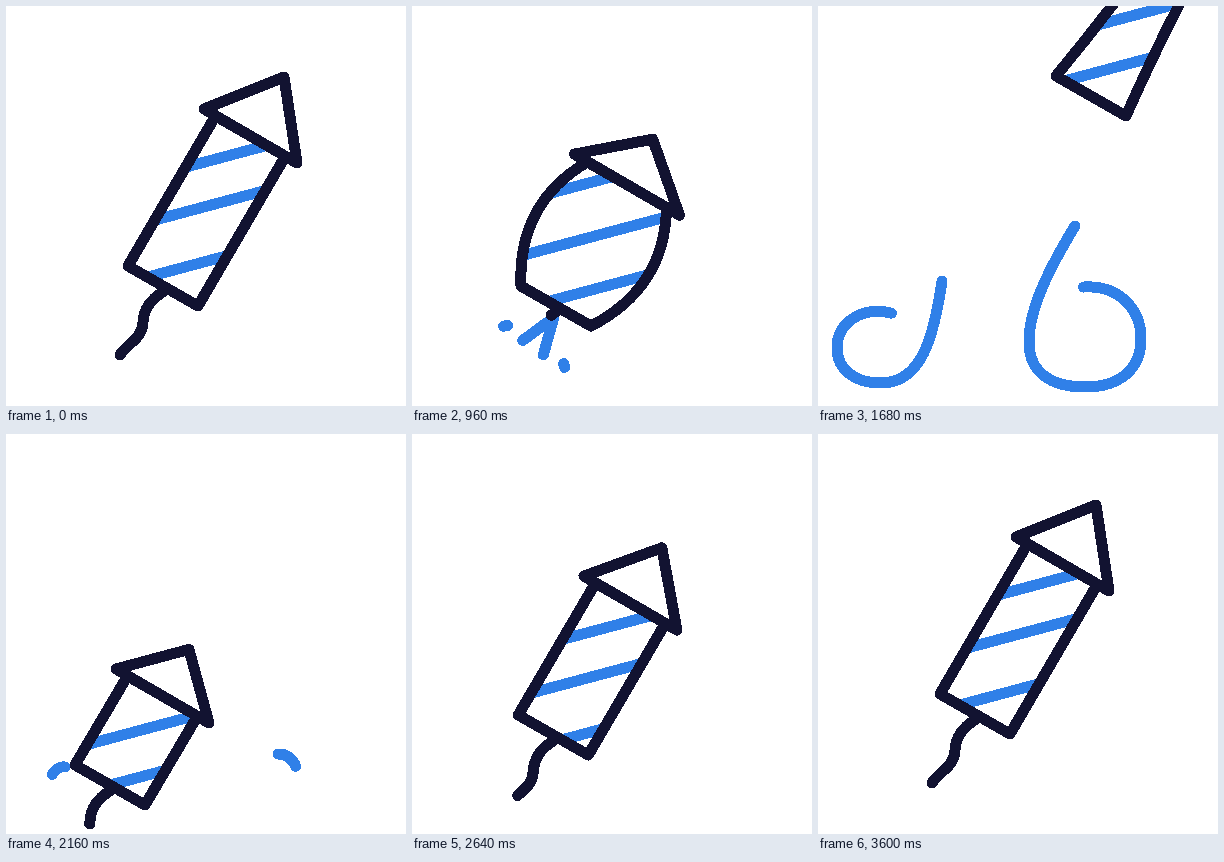
Animation of 400x400 px, one loop 3.63 s. Source, as an HTML page:

```html
<!DOCTYPE html>
<html lang="en">
<head>
<meta charset="utf-8">
<title>Firework rocket</title>
<style>
  html, body { margin: 0; height: 100%; overflow: hidden; background: #fff; }
  svg { display: block; width: 100vw; height: 100vh; shape-rendering: crispEdges; }
  path { fill: none; stroke-width: 11; stroke-linecap: round; stroke-linejoin: round; }
  .ink { stroke: #121331; }
  .blue { stroke: #3080e8; }
  .solid { fill: #fff; }
</style>
</head>
<body>
<svg viewBox="0 0 400 400">
  <clipPath id="inside"><path id="hull"/></clipPath>
  <path id="left" class="blue"/>
  <path id="right" class="blue"/>
  <path id="sparks" class="blue"/>
  <path id="fuse" class="ink" d="M158 285C144 294 138 303 137 316C136 334 122 336 114 349"/>
  <path id="fill" class="solid"/>
  <g clip-path="url(#inside)"><path id="stripes" class="blue"/></g>
  <path id="body" class="ink"/>
  <path id="cone" class="ink solid"/>
</svg>
<script>
const LOOP = 3630, STEP = 30;
const $ = id => document.getElementById(id);
const draw = (id, d) => $(id).setAttribute('d', d);
const show = (id, on) => { $(id).style.visibility = on ? 'visible' : 'hidden'; };
const clamp = u => Math.min(1, Math.max(0, u));
const span = (t, from, to) => clamp((t - from) / (to - from));
const mix = (a, b, u) => a + (b - a) * u;
const blend = (a, b, u) => a.map((v, i) => mix(v, b[i], u));

// Offsets from rest: bottom x y, cone x y, cone height, cone width, bulge, three stripes
const REST = Array(10).fill(0);
const SQUASH = [-13, 20, -29.5, 48.5, -.23, .13, 28, 15, 25, 23].map(v => v * 1.1);
const LAUNCH = [116, -190, 131, -205, .1, -.45, -3, -160, -160, -168];
const RETURN = [-53, 71, -88, 132, -.21, 0, 0, 123, 125, 125];
const JUMP = 1730;

const remaining = t => (Math.max(0, 3600 - t) / 1440) ** 3;

function pose(t) {
  if (t >= JUMP) return blend(REST, RETURN, remaining(t));
  if (t >= 1430) return blend(SQUASH, LAUNCH, ((t - 1430) / 250) ** 3);
  const u = span(t, 560, 1050);
  return blend(REST, SQUASH, u * u * (3 - 2 * u));
}

function drawRocket([bx, by, cx, cy, tall, wide, bulge, ...shifts]) {
  const w = 1 + wide, h = 1 + tall;
  const mx = 244.5 + cx, my = 130 + cy;
  const lx = 157 + bx, ly = 280 + by;
  const side = s => {
    const top = [mx + s * 35 * w, my + s * 20 * w], low = [lx + s * 35, ly + s * 20];
    const at = u => [mix(top[0], low[0], u) + s * .87 * bulge, mix(top[1], low[1], u) + s * .5 * bulge];
    return [top, at(1 / 3), at(2 / 3), low];
  };
  const [a, b, c, d] = side(-1), [e, f, g, i] = side(1);
  const hull = `M${a}C${b} ${c} ${d}L${i}C${g} ${f} ${e}Z`;
  ['hull', 'fill', 'body'].forEach(id => draw(id, hull));
  draw('cone', `M${mx - 46.5 * w} ${my - 27 * w}L${mx + 33.5 * h} ${my - 59 * h}L${mx + 46.5 * w} ${my + 27 * w}Z`);
  draw('stripes', [209.3, 254, 309].map((v, n) => `M0 ${v + shifts[n]}l400 -107.2`).join(''));
}

const fuseLength = $('fuse').getTotalLength();

function drawFuse(t, dx, dy) {
  const burnt = t < JUMP ? span(t, 100, 1070) ** .76 : Math.min(1, .48 * remaining(t));
  const left = fuseLength * (1 - burnt);
  const fuse = $('fuse');
  fuse.setAttribute('transform', `translate(${dx} ${dy})`);
  fuse.style.strokeDasharray = `${left} 9999`;
  show('fuse', burnt < 1);

  const lit = t > 100 && t < 1070;
  show('sparks', lit);
  if (!lit) return;
  const p = ((t + 195) % 300) / 300;
  const end = fuse.getPointAtLength(left);
  const x = end.x + dx * .8, y = end.y + dy * 1.12;
  const ray = (ux, uy, from, to) => `M${x + ux * from} ${y + uy * from}L${x + ux * to} ${y + uy * to}`;
  const arm = 40 * Math.sin(p * Math.PI / 2);
  const inner = 24 + 27 * p, outer = 24 + Math.min(27, 60 * p);
  draw('sparks', ray(-.8, .59, 0, arm) + ray(-.27, .96, 0, arm) +
    ray(-.985, .17, inner, outer) + ray(.21, .98, inner, outer));
}

// Each smoke trail: lead, outer curl, inner curl, tip
const TRAILS = {
  left: ['M129 235C128 250 127 262 124 275',
    'C116 330 104 377 63 377C36 377 19 363 19 342C19 318 42 300 73 307',
    'C92 312 92 330 90 342C87 354 74 359 63 357C50 355 43 349 46 341',
    'C48 337 53 332 59 333'],
  right: ['M272 196C267 204 262 212 257 220',
    'C229 266 211 304 211 336C211 368 235 381 267 381C302 381 323 363 323 333C323 303 301 279 266 281',
    'C244 283 236 305 236 328C236 350 248 362 266 362C284 362 294 350 290 333',
    'C287 325 281 320 272 320']
};
const marks = {};
for (const id in TRAILS) {
  let d = '';
  marks[id] = TRAILS[id].map(part => {
    draw(id, d += part);
    return $(id).getTotalLength();
  });
}

function drawTrail(id, t) {
  const [lead, outer, inner, end] = marks[id];
  const head = t < 1680 ? outer * (1 - (1 - span(t, 1500, 1680)) ** 2) : mix(outer, end, span(t, 1680, 1950));
  const tail = t < 1680 ? lead * span(t, 1560, 1680) : mix(lead, inner, span(t, 1680, 2160));
  show(id, t > 1500 && t < 2180);
  $(id).style.strokeDasharray = `${head - tail} 9999`;
  $(id).style.strokeDashoffset = -tail;
}

const start = performance.now();

function frame() {
  // Animated in steps; the small margin absorbs timer rounding
  const t = Math.floor((performance.now() - start + 2) / STEP) * STEP % LOOP;
  const current = pose(t);
  drawRocket(current);
  drawFuse(t, current[0], current[1]);
  drawTrail('left', t);
  drawTrail('right', t);
  requestAnimationFrame(frame);
}
frame();
</script>
</body>
</html>
```
